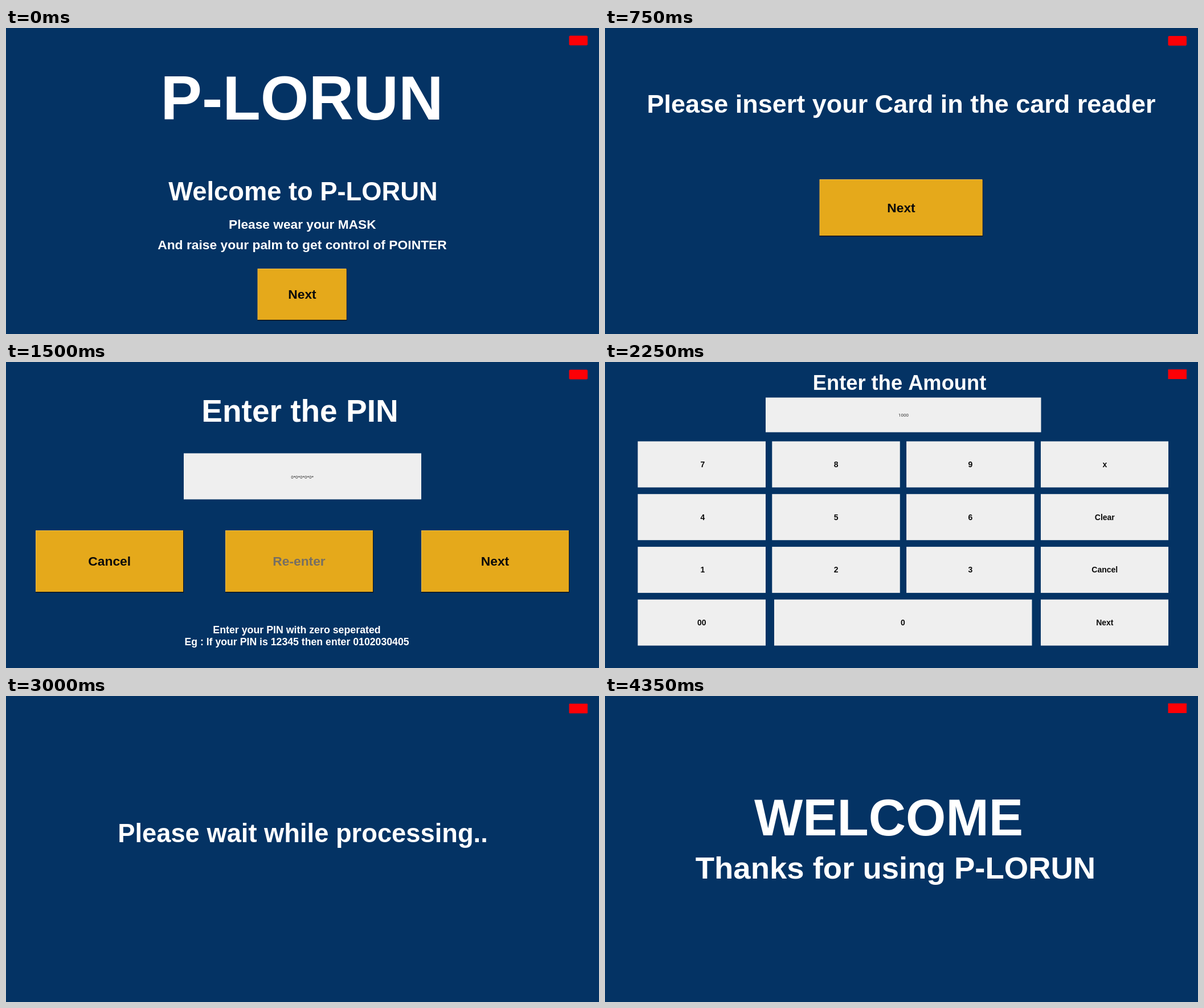
Animation, 1041 px wide and 538 px high, one loop 4750 ms. Source, as an HTML page with a canvas:

```html
<!DOCTYPE html>
<html lang="en">
<head>
<meta charset="utf-8">
<title>Touch-free teller</title>
<style>
  html, body { margin: 0; width: 100%; height: 100%; overflow: hidden; background: #043364; }
  canvas { display: block; }
</style>
</head>
<body>
<canvas id="stage" width="1041" height="538"></canvas>
<script>
const ctx = document.getElementById('stage').getContext('2d');
const NAVY = '#043364', AMBER = '#e5a91b', PALE = '#efefef', WHITE = '#fff', INK = '#0b0b0b';
const SCREEN_MS = 750, LOOP_MS = 4750;
const BRAND = 'P-LORUN';

function box(x, y, w, h, color) {
  ctx.fillStyle = color;
  ctx.fillRect(x, y, w, h);
}

function text(label, x, baseline, size, color = WHITE, font = 'bold', family = '"Liberation Sans", Arial, sans-serif') {
  ctx.font = `${font} ${size}px ${family}`;
  ctx.fillStyle = color;
  ctx.textAlign = 'center';
  ctx.fillText(label, x, baseline);
}

// Raised button: dark lower right edge, faint light upper left edge.
function button(label, x, y, w, h, labelX, baseline, color = INK) {
  box(x, y, w + 1, h + 1.5, '#10151c');
  box(x, y, w, h, '#e9b94c');
  box(x + 1, y + 1, w - 1, h - 1, AMBER);
  text(label, labelX, baseline, 22.8, color);
}

function entry(value, x, y, w, h, labelX, baseline) {
  box(x, y, w, h, PALE);
  text(value, labelX, baseline, 8, '#333', 'normal', 'Roboto, sans-serif');
}

function key(label, x, row, w, labelX) {
  const y = 139.5 + row * 92.7;
  box(x, y, w, 81, PALE);
  text(label, labelX, y + 45.5, 14, INK);
}

function indicator(y, radius) {
  ctx.fillStyle = '#fd0006';
  ctx.beginPath();
  ctx.roundRect(988.5, y, 32.5, 17, radius);
  ctx.fill();
}

function welcome() {
  indicator(13.5, 2);
  text(BRAND, 519.5, 161, 109);
  text('Welcome to ' + BRAND, 521.5, 303, 45.3);
  text('Please wear your MASK', 520.3, 353.3, 22.7);
  text('And raise your palm to get control of POINTER', 520, 388.7, 22.85);
  button('Next', 441.5, 423, 156, 90, 520, 476);
}

function insertCard() {
  indicator(14, 2);
  text('Please insert your Card in the card reader', 520, 148.7, 45);
  button('Next', 376.5, 266, 286, 99, 520, 323.5);
}

function enterPin() {
  indicator(13.5, 2);
  text('Enter the PIN', 516, 104.7, 55);
  entry('0*'.repeat(5), 312, 160.5, 417, 81, 520, 204.5);
  button('Cancel', 52, 296, 259, 108, 181.7, 358);
  button('Re-enter', 385, 296, 259, 108, 514.5, 358, '#766f63');
  button('Next', 729, 296, 259, 108, 858.5, 358);
  text('Enter your PIN with zero seperated', 510.5, 477, 17.8);
  text('Eg : If your PIN is 12345 then enter 0102030405', 510.5, 498, 17.7);
}

function enterAmount() {
  indicator(13, 0);
  text('Enter the Amount', 517, 48.7, 36.3);
  entry('1000', 282, 62.5, 483.5, 61, 524, 96);
  ['789', '456', '123'].forEach((digits, row) =>
    [...digits].forEach((digit, col) =>
      key(digit, 57.5 + col * 235.8, row, 224.5, col ? 169.8 + col * 235.8 : 171.5)));
  ['x', 'Clear', 'Cancel', 'Next'].forEach((label, row) => key(label, 765, row, 224, 877.3));
  key('00', 57.5, 3, 224.5, 169.7);
  key('0', 297, 3, 452.5, 523);
}

function processing() {
  indicator(13.5, 1);
  text('Please wait while processing..', 521, 256.7, 45.3);
}

function thanks() {
  indicator(13, 0);
  text('WELCOME', 498, 245, 90.4);
  text('Thanks for using ' + BRAND, 510, 320.7, 54.5);
}

const screens = [welcome, insertCard, enterPin, enterAmount, processing, thanks];

function draw() {
  const time = performance.now() % LOOP_MS;
  box(0, 0, 1041, 538, NAVY);
  screens[Math.min(Math.floor(time / SCREEN_MS), screens.length - 1)]();
  requestAnimationFrame(draw);
}
draw();
</script>
</body>
</html>
```
